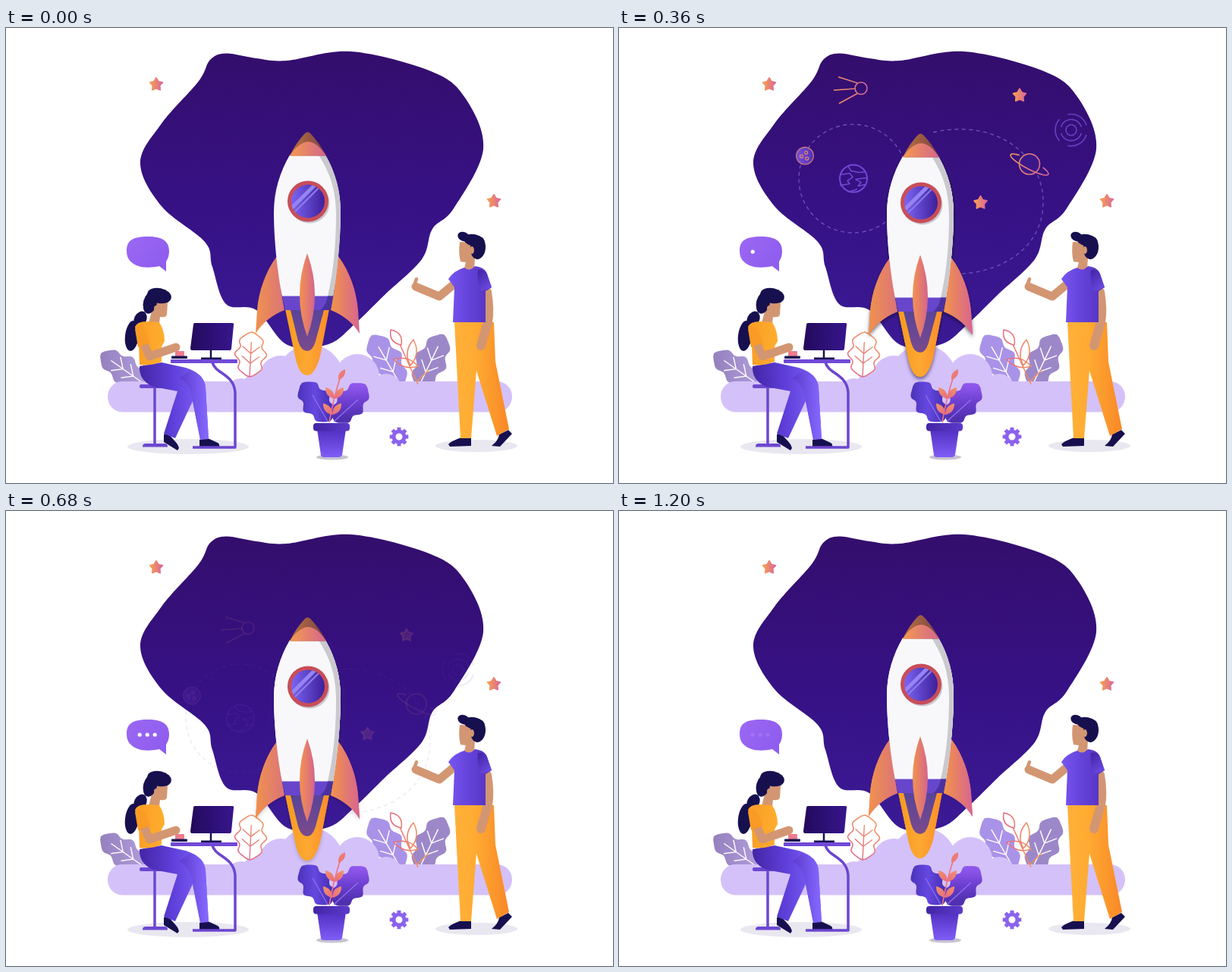
Animation of 800 by 600 pixels, one loop 1.24 s. Source, as an HTML page with a canvas:

```html
<!DOCTYPE html>
<html lang="en">
<head>
<meta charset="utf-8">
<title>Rocket launch</title>
<style>
html, body { margin: 0; width: 100%; height: 100%; overflow: hidden; background: #fff; }
canvas { display: block; width: 800px; height: 600px; }
</style>
</head>
<body>
<canvas id="stage" width="800" height="600"></canvas>
<script>
const ctx = document.getElementById('stage').getContext('2d');
const LOOP = 1240, STEP = 40, TAU = Math.PI * 2;
const NAVY = '#17104f', SKIN = '#d39672', VIOLET = '#7049d6';

const clamp = v => Math.max(0, Math.min(1, v));
const ramp = (t, a, b) => clamp((t - a) / (b - a));

// Linear gradient between two points
function grad(x0, y0, x1, y1, ...colors) {
  const g = ctx.createLinearGradient(x0, y0, x1, y1);
  colors.forEach((c, i) => g.addColorStop(i / (colors.length - 1), c));
  return g;
}
const across = (x0, x1, ...colors) => grad(x0, 0, x1, 0, ...colors);
const down = (y0, y1, ...colors) => grad(0, y0, 0, y1, ...colors);

const toPath = p => typeof p === 'string' ? new Path2D(p) : p;

function fill(path, color) {
  ctx.fillStyle = color;
  ctx.fill(toPath(path));
}

function line(path, color, width = 1.5) {
  ctx.strokeStyle = color;
  ctx.lineWidth = width;
  ctx.stroke(toPath(path));
}

function oval(x, y, rx, ry = rx, turn = 0, from = 0, to = TAU) {
  const path = new Path2D();
  path.ellipse(x, y, rx, ry, turn, from, to);
  return path;
}

function box(x, y, w, h, r = 0) {
  const path = new Path2D();
  path.roundRect(x, y, w, h, r);
  return path;
}

// The same shape flipped about the vertical line at x
function mirror(path, x) {
  const flipped = new Path2D();
  flipped.addPath(toPath(path), new DOMMatrix([-1, 0, 0, 1, 2 * x, 0]));
  return flipped;
}

// Closed smooth curve through key points, given as "x,y x,y ..."
function curve(text) {
  const pts = text.split(' ').map(p => p.split(',').map(Number));
  const at = i => pts[(i + pts.length) % pts.length];
  const path = new Path2D();
  path.moveTo(...pts[0]);
  pts.forEach((b, i) => {
    const a = at(i - 1), c = at(i + 1), d = at(i + 2);
    path.bezierCurveTo(b[0] + (c[0] - a[0]) / 6, b[1] + (c[1] - a[1]) / 6,
      c[0] - (d[0] - b[0]) / 6, c[1] - (d[1] - b[1]) / 6, c[0], c[1]);
  });
  return path;
}

// Round-ended limb along a path
function limb(path, color, width) {
  ctx.lineCap = 'round';
  line(path, color, width);
  ctx.lineCap = 'butt';
}

// Pointed leaf from one tip to the other
function leaf(x0, y0, x1, y1, w) {
  const mx = (x0 + x1) / 2, my = (y0 + y1) / 2, len = Math.hypot(x1 - x0, y1 - y0);
  const nx = (y1 - y0) / len * w, ny = (x0 - x1) / len * w;
  return `M${x0} ${y0}Q${mx + nx} ${my + ny} ${x1} ${y1}Q${mx - nx} ${my - ny} ${x0} ${y0}Z`;
}

// Lobed leaf growing from a base to a tip, with its veins
function lobed(x0, y0, x1, y1, w) {
  const dx = x1 - x0, dy = y1 - y0, len = Math.hypot(dx, dy);
  const point = (s, h) => [x0 + dx * s - dy / len * h, y0 + dy * s + dx / len * h];
  const shape = new Path2D(), veins = new Path2D();
  for (let i = 0; i < 80; i++) {
    const s = 1 - Math.abs(1 - i / 40), side = i < 40 ? 1 : -1;
    const wave = 0.86 - 0.14 * Math.cos(6 * Math.PI * s);
    shape.lineTo(...point(s, side * w * wave * Math.sqrt(Math.sin(Math.PI * s))));
  }
  shape.closePath();
  veins.moveTo(x0, y0);
  veins.lineTo(...point(0.78, 0));
  for (const s of [0.3, 0.52]) {
    veins.moveTo(...point(s + 0.16, w * 0.55));
    veins.lineTo(...point(s, 0));
    veins.lineTo(...point(s + 0.16, -w * 0.55));
  }
  return { shape, veins };
}

function star(x, y) {
  const path = new Path2D();
  for (let i = 0; i < 10; i++) {
    const r = i % 2 ? 4.9 : 8.8, a = i * Math.PI / 5 - Math.PI / 2;
    path.lineTo(x + r * Math.cos(a), y + 0.5 + r * Math.sin(a));
  }
  path.closePath();
  const g = across(x - 9, x + 9, '#f7a24e', '#d9659c');
  fill(path, g);
  line(path, g, 1.8);
}

const blob = curve('290,33.5 330,40 370,43 455,31 560,57 605,92 629,160 590,238 562,265 548,305 499,352 462,388 425,417 371,418 330,372 290,364 272,315 262,282 205,235 177,178 205,126 254,70 269,42');

function backdrop() {
  fill(blob, down(30, 425, '#340e6c', '#361184', '#3b1a96'));
  star(198, 74);
  star(643, 228);
}

function orbits() {
  ctx.setLineDash([5, 4.5]);
  line(oval(308.5, 214, 71.5), '#6d50bd', 1.3);
  line('M414 153C500 134 559 185 559 245S505 340 440 340', '#6d50bd', 1.3);
  ctx.setLineDash([]);
}

function planets() {
  line(oval(309, 214, 18), VIOLET, 2);
  line('M302 198L306 204L317 206L325 205M292 209L304 207L308 212L301 217L304 221L291 223M326 213L312 215L319 219L315 224L324 222M305 231L314 228', VIOLET, 1.5);

  fill(oval(245, 184, 11), across(234, 256, '#7550d8', '#5530b5'));
  line(oval(245, 184, 11.3), '#c97a82', 1.3);
  for (let i = 0; i < 3; i++) {
    const a = 0.9 + i * TAU / 3;
    line(oval(245 + 4.5 * Math.cos(a), 184 + 4.5 * Math.sin(a), 2), '#df8770', 1.2);
  }

  const warm = grad(515, 180, 567, 210, '#f0985b', '#d6649a');
  fill(oval(541, 195, 13.5), '#3c1789');
  line(oval(541, 195, 13.5), warm, 1.6);
  line(oval(541, 195.5, 28, 6, 0.48, -0.9, Math.PI + 0.9), warm, 1.6);

  // Radar rings broken into arcs
  for (let ring = 1; ring <= 3; ring++) {
    const count = ring === 1 ? 1 : ring, arc = ring === 1 ? TAU : TAU / count - 0.6;
    for (let i = 0; i < count; i++) {
      const from = 0.3 + i * TAU / count;
      line(oval(596, 150, 7 * ring, 7 * ring, 0, from, from + arc), '#6541c4', 1.6);
    }
  }

  const probe = across(283, 328, '#ef975c', '#d2669b');
  line(oval(319, 95, 8), probe, 1.6);
  line('M314 88L289 80M311 95.5L283 97.5M314 102L290 115', probe, 1.6);
  star(528, 104);
}

function space(shift, starShift, alpha) {
  if (!alpha) return;
  ctx.save();
  ctx.clip(box(0, 30, 800, 570));
  ctx.globalAlpha = alpha;
  ctx.save();
  ctx.translate(0, shift);
  orbits();
  planets();
  ctx.restore();
  star(476.5, 239 + starShift);
  ctx.restore();
}

function bush(x0, y0, x1, y1, w, color) {
  const { shape, veins } = lobed(x0, y0, x1, y1, w);
  fill(shape, color);
  line(veins, '#fff', 1.4);
}

function bushes() {
  bush(186, 472, 125, 429, 20, across(126, 180, '#9681bf', '#ad9bd9'));
  bush(522, 474, 482, 405, 22, '#a993e8');
  bush(543, 475, 577, 404, 22, '#9c88c9');
}

function ground() {
  const cloud = box(134, 466, 533, 40.5, 20);
  for (const [x, y, r] of [[153, 484, 18], [310, 482, 20], [336, 478, 26], [362, 460, 28], [401, 462, 44], [463, 459, 29], [501, 476, 20]])
    cloud.addPath(oval(x, y, r));
  fill(cloud, '#d4c1f9');

  const sprig = across(510, 556, '#e76b80', '#f49d52');
  line('M543 470L519 417M557 451L541 467', sprig);
  line(leaf(521, 418, 507, 398, 12), sprig);
  line(leaf(543, 446, 511, 437, 11), sprig);
  line(leaf(533, 445, 537, 411, 12), sprig);

  const edge = grad(303, 458, 344, 400, '#dd668f', '#f5a05c');
  const { shape, veins } = lobed(321, 460, 324, 401, 21);
  fill(shape, '#fff');
  line(shape, edge, 1.6);
  line(veins, edge, 1.4);
}

const fin = 'M357 301C342 321 333 347 331 372L329 403Q342 382 367 372L363 350Z';

function rocketShape() {
  fill(fin, across(330, 366, '#f0914d', '#db7479'));
  fill(mirror(fin, 397.5), across(430, 466, '#f0914d', '#d8658f'));

  fill('M368 371H426L414 433Q407 458 397 458Q386 458 381 433Z', across(368, 426, '#f59a20', '#fda832', '#fb8c29'));
  fill('M375 372H419L408 413Q404 426 397 426Q389 426 385 413Z', down(372, 426, '#58449a', '#7b4a8c'));
  fill('M374 167.5H421C434 190 441 215 441 243C441 280 436 325 431 354H364C358 325 353 280 353 243C353 215 361 190 374 167.5Z', '#f8f8fb');
  fill('M412 167.5H421C434 190 441 215 441 243C441 280 436 325 431 354H424C432 318 435 285 435 245C435 213 426 189 412 167.5Z', '#c9c9ce');
  fill('M364 353.5H431L427 372H368Z', '#6846cc');
  fill('M414 372Q422 366 424 353.5H431L427 372Z', '#4932a0');
}

function rocket(dy, shade) {
  ctx.save();
  ctx.translate(0, dy);
  if (shade) {
    ctx.save();
    ctx.shadowColor = `rgba(20,10,45,${shade})`;
    ctx.shadowBlur = 5;
    ctx.shadowOffsetY = 3;
    rocketShape();
    ctx.restore();
  }
  rocketShape();

  fill('M374 168.5C380 156 388 145 394 139Q397.5 135.5 401 139C408 146 416 157 422 168.5Z', across(380, 418, '#b36b42', '#7e4842'));
  fill('M374 168.5C381 157 391 150 398 150C407 150 415 158 422 168.5Z', across(374, 422, '#f39a4f', '#d5668d'));
  fill(leaf(397, 297, 397, 407, 20), across(387, 407, '#f3924f', '#d4658b'));

  const glass = oval(398, 228.5, 22);
  fill(oval(400, 231, 26.5), '#c9c9cf');
  fill(oval(398, 228.5, 27), '#c84e58');
  fill(glass, across(377, 420, '#7a63f0', '#3e209c'));
  ctx.save();
  ctx.clip(glass);
  line('M372 242L408 206', '#9584f2', 5);
  line('M378 245L415 208', '#8f7eea', 2);
  ctx.restore();
  ctx.restore();
}

function bubble(t) {
  const g = grad(159, 275, 215, 318, '#9b68f3', '#8d5bee');
  fill('M159 294C159 281 166 275 187 275C207 275 215 282 215 294C215 301 213 305 211 308V321L202 314C193 316 181 317 172 313C163 309 159 303 159 294Z', g);
  const out = 1 - ramp(t, 1000, 1225);
  [40, 440, 480].forEach((begin, i) => {
    const p = ramp(t, begin, begin + 190);
    ctx.globalAlpha = p * out;
    fill(oval(176.2 + 10 * i, 295, 1.4 + 1.2 * p), '#fff');
  });
  ctx.globalAlpha = 1;
}

function woman() {
  fill(oval(240, 552, 80, 10), '#e9e7f0');
  line('M196 474V550', '#6d47d2', 3.5);
  fill(box(180, 548, 33, 4.5, [4, 4, 0, 0]), '#6d47d2');
  fill(box(176, 470, 35, 5, 2), '#6d47d2');

  fill('M208 536L213 534L221 543Q227 549 228 554L226 557L208 546Z', NAVY);
  fill('M255 543L266 541L279 547Q282 549 281 552H255Z', NAVY);
  const denim = across(176, 266, '#4325a6', '#5f40da', '#8467ff');
  fill('M176 446L205 441L237 448Q262 456 263 474L267 542H256L246 492L223 541L208 535L226 479L194 473Q175 465 176 446Z', denim);
  fill('M228 462Q243 468 246 492L256 543L267 542L263 474Q261 458 243 451Z', across(225, 266, '#5737c8', '#8568ff'));

  fill(oval(166, 406, 9, 20, 0.12), NAVY);
  fill(oval(177, 384, 8, 11, 0.5), NAVY);
  fill('M196 358L213 362L212 378Q211 382 203 381L202 389H188Z', SKIN);
  fill(oval(190, 362, 9, 15, 0.25), NAVY);
  fill(oval(202, 353, 16, 10, 0.2), NAVY);
  fill(oval(198, 370, 3, 4), SKIN);
  fill('M170 394Q173 387 185 387L202 388Q209 399 209 413L205 420V440Q190 446 176 444L175 417Z', across(170, 210, '#f99c25', '#ffae2e'));
  limb('M182 417L189 433L224 421', SKIN, 11);
  fill('M170 397Q176 390 183 398L190 415L174 421Z', '#f99b24');
}

function desk() {
  fill(box(223, 426, 12, 7, 1), '#ee7c8d');
  fill(box(218, 432.5, 21, 3.5, 1), NAVY);
  fill('M249 389H298Q301 389 300 392L297 423Q297 425 295 425H245Q243 425 243 422L247 391Q247 389 249 389Z', across(245, 300, '#240a5e', '#37168d'));
  line('M270 425V435', NAVY, 2.5);
  fill(box(257, 434.5, 27, 2.5), NAVY);
  fill(box(217, 437, 88, 5, 1), VIOLET);
  line('M272 441C276 456 300 456 302 480V553H246', '#6c46cf', 3.5);
}

function man() {
  fill(oval(620, 551, 54, 8), '#e9e7f0');
  fill('M583 549Q586 545 600 540H613V551L585 552Z', NAVY);
  fill('M640 551Q649 544 650 536L662 530L667 535L651 552Z', NAVY);
  fill('M591 388H643L620 452L613 541H599Z', across(591, 640, '#ffb139', '#ffa62d'));
  fill('M608 388H643L645 440L663 529L647 538L620 452Z', across(615, 660, '#ffad33', '#f98a28'));

  limb('M589 339L571 354L540 341', SKIN, 11);
  limb('M541 331L538 339', SKIN, 4.5);
  limb('M634 348Q638 372 635 388L626 419', SKIN, 12);
  fill('M598 282L617 283L618 303L617 318L603 320L606 309L599 308Q596 296 598 282Z', SKIN);
  fill('M583 331Q590 320 604 316Q611 322 618 314Q629 315 633 322L640 342L632 347V388H589L591 342Z', across(586, 634, '#7553ee', '#6443da', '#5735c4'));
  fill('M622 319Q630 317 634 324L640 342L626 347Q620 332 622 319Z', grad(622, 320, 640, 340, '#4325a5', '#6a49e0'));
  fill(oval(603, 275, 8, 6, 0.4), NAVY);
  fill(oval(617, 280, 14, 8, 0.2), NAVY);
  fill(oval(622, 290, 10, 15, 0.1), NAVY);
  fill(oval(614, 293, 3, 5), SKIN);
}

function pot() {
  fill(oval(430, 566, 21, 3.5), '#c6c3cf');
  const left = lobed(428, 518, 390, 468, 21), right = lobed(433, 519, 474, 470, 21);
  fill(left.shape, across(386, 428, '#4c34bd', '#6648e0', '#4830b7'));
  fill(right.shape, down(472, 514, '#8f57ec', '#6c3fd0', '#5130b0'));
  line('M404 484L424 519M464 490L432 519', '#8f70ef', 1.3);

  line('M426 520Q431 490 441 459', '#ee7280', 1.6);
  fill(leaf(438, 464, 447, 450, 7), '#ec7b75');
  // Paired leaves up the stem
  for (const [x, y] of [[430, 510], [433, 489]])
    for (const side of [-1, 1])
      fill(leaf(x, y, x + side * 12, y - 15, 8), grad(x, y, x + side * 12, y - 15, '#e76c82', '#f39168'));

  fill('M410 529H448L443 563Q442 566 438 566H419Q415 566 415 563Z', down(530, 566, '#5230c2', '#805df7'));
  fill(box(405, 521, 48, 10.5, 4), across(405, 453, '#4325a5', '#5c3acb'));
}

function gear() {
  const color = '#8b62ed';
  for (let i = 0; i < 8; i++) {
    const a = i * TAU / 8, c = Math.cos(a), s = Math.sin(a);
    line(`M${518 + 6 * c} ${539 + 6 * s}L${518 + 12.3 * c} ${539 + 12.3 * s}`, color, 5);
  }
  line(oval(518, 539, 7), color, 5);
}

function draw(t) {
  ctx.clearRect(0, 0, 800, 600);
  ctx.lineJoin = 'round';
  const alpha = ramp(t, 40, 190) * (1 - ramp(t, 520, 705));
  const arrive = Math.pow(1 - ramp(t, 40, 520), 2.69);
  const leave = 1 - Math.pow(1 - ramp(t, 520, 880), 2);
  const bob = 1.5 * (1 - Math.cos(TAU * t / LOOP));

  backdrop();
  space(86 * leave - 297 * arrive, 79 * leave - 171 * arrive, alpha);
  bushes();
  ground();
  rocket(bob, 0.5 * alpha + 0.04 * bob);
  bubble(t);
  woman();
  desk();
  man();
  pot();
  gear();
}

const start = performance.now();
function tick() {
  const t = (performance.now() - start) % LOOP;
  draw(Math.floor(t / STEP) * STEP);
  requestAnimationFrame(tick);
}
tick();
</script>
</body>
</html>
```
